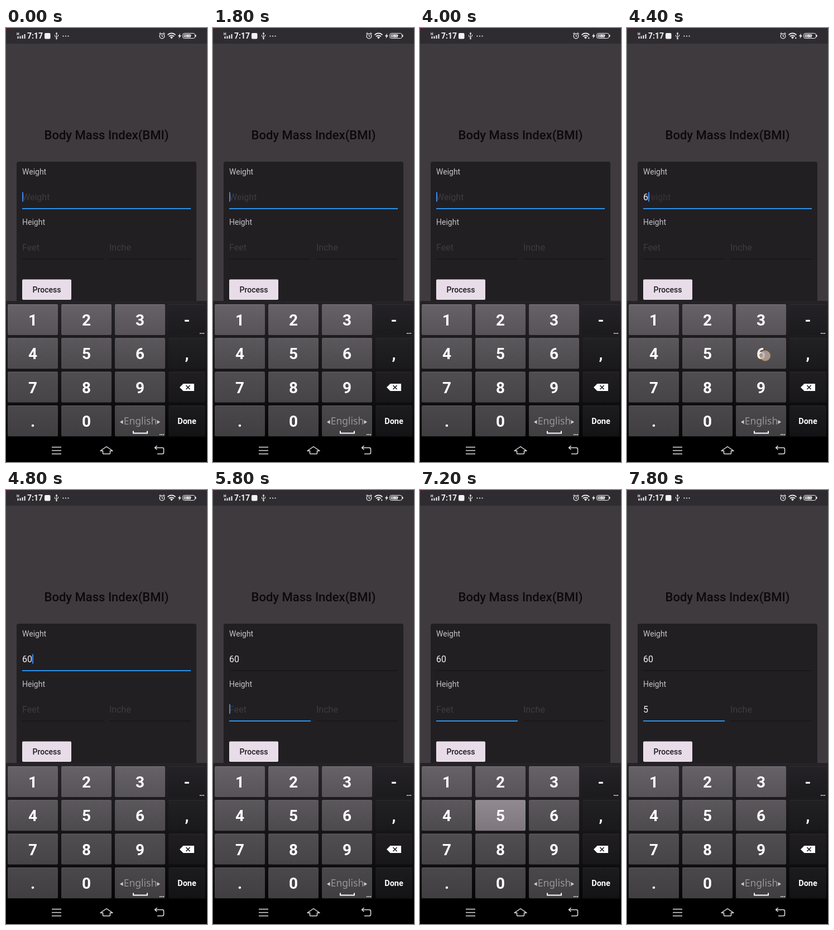
Write an HTML page that moves like this. It is 360x776 px and loops after 8 s.

```html
<!DOCTYPE html>
<html lang="en">
<head>
<meta charset="utf-8">
<title>BMI form</title>
<style>
  html, body { margin: 0; width: 100%; height: 100%; overflow: hidden; background: #000; }
  svg { display: block; width: 360px; height: 776px; }
  text { font-family: Roboto, sans-serif; white-space: pre; }
  .title { font-size: 22px; font-weight: 500; fill: #0b090b; }
  .label { font-size: 14px; fill: #c6c2c7; }
  .hint { font-size: 16px; fill: #3f3b40; }
  .value { font-size: 16px; fill: #f4f0f4; }
  .key { font-size: 28px; font-weight: 700; fill: #fff; text-anchor: middle; }
  .line { fill: none; stroke: #e2dfe3; stroke-width: 1.5; stroke-linejoin: round; }
</style>
</head>
<body>
<svg id="stage" viewBox="0 0 360 776">
  <defs>
    <linearGradient id="board" x2="0" y2="1">
      <stop stop-color="#252327"/><stop offset=".55" stop-color="#111012"/><stop offset="1" stop-color="#000"/>
    </linearGradient>
  </defs>
  <rect width="360" height="776" fill="#3e3a3d"/>
  <rect width="360" height="28" fill="#2f2c31"/>
  <rect width="6" height="1" fill="#7a1232"/>

  <g id="status" fill="#f4f2f5">
    <text x="19" y="12.5" font-size="6.5" font-weight="700">H</text>
    <path d="M20.5 15h2v4h-2zM24.5 14.5h2v4.5h-2zM28.5 13h2v6h-2zM32.5 11h2v8h-2z"/>
    <text x="38" y="19" font-size="14" font-weight="700">7:17</text>
    <rect x="69" y="9" width="10.5" height="10.5" rx="2"/>
    <g fill="none" stroke="#f4f2f5">
      <path d="M90.500 10v9M87.500 12.500v2.500l3 2M93.500 12v2.500l-3 2"/>
      <circle cx="279.500" cy="14.500" r="4.300" stroke-width="1.300"/>
      <path d="M279.500 12v3h2M274.500 10.500l2.500-2M284.500 10.500l-2.500-2" stroke-width="1.200"/>
      <path d="M289.500 12.500a9.500 9.500 0 0 1 14 0M292 15.200a6.300 6.300 0 0 1 9 0" stroke-width="1.700"/>
      <rect x="316.500" y="9.500" width="22" height="9" rx="3"/>
    </g>
    <path d="M90.500 7.500l2 3h-4zM294 16.800a3.600 3.600 0 0 1 5 0L296.500 19.500z"/>
    <circle cx="90.500" cy="19" r="1.300"/>
    <circle cx="102.500" cy="14.500" r="1.100"/><circle cx="107" cy="14.500" r="1.100"/><circle cx="111.500" cy="14.500" r="1.100"/>
    <path d="M312 9.500l-4 5.500h2.500l-1 4 4.500-5.800h-2.800z"/>
    <rect x="318" y="11" width="13" height="6" rx="1.500" fill="#aaa7ab"/>
    <rect x="339" y="12" width="1.500" height="4" rx=".7"/>
    <text x="327.500" y="17" font-size="8" font-weight="700" text-anchor="middle">57</text>
    <circle id="wifiDot" cx="302.300" cy="18" r="1.200"/>
  </g>

  <text class="title" x="180" y="199" text-anchor="middle">Body Mass Index(BMI)</text>
  <rect x="19" y="239" width="322" height="260" rx="4" fill="#211f22"/>
  <text class="label" x="29" y="262">Weight</text>
  <text class="label" x="29" y="352">Height</text>
  <text class="hint" id="weightHint" x="29" y="307.500">Weight</text>
  <text class="hint" id="feetHint" x="29" y="397.500">Feet</text>
  <text class="hint" x="185" y="397.500">Inche</text>
  <text class="value" id="weight" x="29" y="307.500"></text>
  <text class="value" id="feet" x="29" y="397.500"></text>
  <rect id="weightLine" x="29" width="302"/>
  <rect id="feetLine" x="29" width="146"/>
  <rect x="185" y="412.500" width="146" height="1" fill="#121113"/>
  <rect id="caret" width="2" height="17" fill="#3f83ea"/>
  <circle id="fieldTouch" cx="98" cy="401" r="9" fill="#b9a8a5" fill-opacity=".7" stroke="#b98f45"/>
  <rect x="29" y="449.500" width="88" height="36.500" rx="2" fill="#e7dce8"/>
  <text x="73" y="472.500" font-size="14" font-weight="500" text-anchor="middle" fill="#1d1a20">Process</text>

  <rect y="488" width="360" height="288" fill="url(#board)"/>
  <rect y="732" width="360" height="44" fill="#000"/>
  <g id="keys"></g>
  <g fill="#fff">
    <path d="M311 642.500l6.500-6.500H337v13h-19.500z"/>
    <path d="M322.500 639l7 7m0-7l-7 7" stroke="#1b1a1c" stroke-width="1.700"/>
    <text x="324" y="708" font-size="14.500" font-weight="700" text-anchor="middle">Done</text>
    <path d="M228 720.500v4h25v-4" fill="none" stroke="#fff" stroke-width="2"/>
    <path d="M209.500 701v7l-5.500-3.500zM270.500 701v7l5.500-3.500z" fill="#d0cdd1"/>
  </g>
  <text x="240.500" y="709" text-anchor="middle" fill="#98959a" style="font:300 17.500px 'Noto Sans', sans-serif">English</text>
  <g id="dots" fill="#c9c6ca"></g>
  <circle id="keyTouch" r="9" fill="#b9a8a5" fill-opacity=".8" stroke="#c39a48"/>
  <g class="line">
    <path d="M82 749.500h17M82 755.500h17M82 761.500h17"/>
    <path d="M180 748.500l11 7.500h-4.500v4.500q0 1-1 1h-11q-1 0-1-1V756H169z"/>
    <path d="M270.500 747l-4 3.500 4 3.500M267 750.500h13q2.500 0 2.500 2.500v6q0 2.500-2.500 2.500h-9"/>
  </g>
</svg>
<script>
const LOOP = 8000;
const $ = id => document.getElementById(id);

function add(parent, tag, attrs, text = '') {
  const el = document.createElementNS('http://www.w3.org/2000/svg', tag);
  set(el, attrs);
  el.textContent = text;
  parent.append(el);
  return el;
}
function set(el, attrs) {
  for (const name in attrs) el.setAttribute(name, attrs[name]);
}
function gradient(id, top, bottom) {
  const g = add(document.querySelector('defs'), 'linearGradient', { id, x2: 0, y2: 1 });
  add(g, 'stop', { 'stop-color': top });
  add(g, 'stop', { offset: 1, 'stop-color': bottom });
}

// Keyboard
const shades = [['#676168', '#575358'], ['#5b575c', '#4d4a4e'], ['#514e52', '#464447'], ['#4a484b', '#403e41']];
const darks = [['#242226', '#1b1a1d'], ['#212023', '#19181b'], ['#201e21', '#171618'], ['#1c1b1d', '#131214']];
const labels = ['123-', '456,', '789 ', '.0  '];
const keys = {};
gradient('pressed', '#918990', '#7d777d');
labels.forEach((row, r) => {
  gradient('key' + r, ...shades[r]);
  gradient('dark' + r, ...darks[r]);
  [...row].forEach((char, c) => {
    const x = 3 + 96 * c, y = 494 + 60.3 * r, width = c < 3 ? 90 : 66;
    const fill = `url(#${c < 3 ? 'key' : 'dark'}${r})`;
    const rect = add($('keys'), 'rect', { x, y, width, height: 55, rx: 2, fill });
    add($('keys'), 'rect', { x: x + 1, y, width: width - 2, height: 1, fill: '#fff', opacity: c < 3 ? .13 : .06 });
    add($('keys'), 'text', { class: 'key', x: x + width / 2, y: y + 38 }, char);
    if (char !== ' ') keys[char] = { rect, fill };
  });
});
for (const [x, y] of [[348, 546], [276, 727]])
  for (let i = 0; i < 3; i++) add($('dots'), 'rect', { x: x + 3 * i - 1, y: y - 1, width: 2, height: 2 });

// Each track lists [start time, value] steps
const tracks = {
  wifi: [[0, 0], [400, 1], [1400, 0], [3800, 1], [4800, 0], [5800, 1], [7800, 0]],
  caret: [[0, 1], [400, 0], [800, 1], [1400, 0], [1800, 1], [2400, 0], [2800, 1], [3400, 0], [3800, 1],
          [5000, 0], [5600, 1], [6000, 0], [6400, 1], [6800, 0], [7400, 1], [7800, 0]],
  caretAt: [[0, [29, 293.5]], [4400, [38, 293.5]], [4800, [47, 293.5]], [5600, [29, 383]], [7400, [38, 383]]],
  weight: [[0, ''], [4400, '6'], [4800, '60']],
  feet: [[0, ''], [7400, '5']],
  weightHint: [[0, 1], [4400, .7], [4600, 0]],
  feetHint: [[0, 1], [7400, .7], [7600, 0]],
  feetFocus: [[0, false], [5800, true]],
  pressed: [[0, ''], [4200, '6'], [4400, ''], [4600, '0'], [4800, ''], [7200, '5'], [7400, '']],
  keyTouch: [[0, null], [4400, [247.5, 586]], [4600, null], [7400, [150, 590]], [7600, null]],
  fieldTouch: [[0, 0], [5600, 1], [5800, 0]]
};
const at = (name, t) => tracks[name].findLast(step => step[0] <= t)[1];

function underline(el, y, focused) {
  set(el, focused ? { y: y - .5, height: 2, fill: '#2a91ea' } : { y, height: 1, fill: '#121113' });
}

function render(t) {
  const focus = at('feetFocus', t), touch = at('keyTouch', t), pressed = at('pressed', t);
  const [x, y] = at('caretAt', t);
  set($('wifiDot'), { opacity: at('wifi', t) });
  set($('caret'), { x, y, opacity: at('caret', t) });
  for (const id of ['weight', 'feet']) {
    $(id).textContent = at(id, t);
    set($(id + 'Hint'), { opacity: at(id + 'Hint', t) });
  }
  underline($('weightLine'), 322.5, !focus);
  underline($('feetLine'), 412.5, focus);
  for (const k in keys) set(keys[k].rect, { fill: k === pressed ? 'url(#pressed)' : keys[k].fill });
  set($('keyTouch'), touch ? { cx: touch[0], cy: touch[1], opacity: 1 } : { opacity: 0 });
  set($('fieldTouch'), { opacity: at('fieldTouch', t) });
}

const start = performance.now();
function tick() {
  render((performance.now() - start) % LOOP);
  requestAnimationFrame(tick);
}
tick();
</script>
</body>
</html>
```
